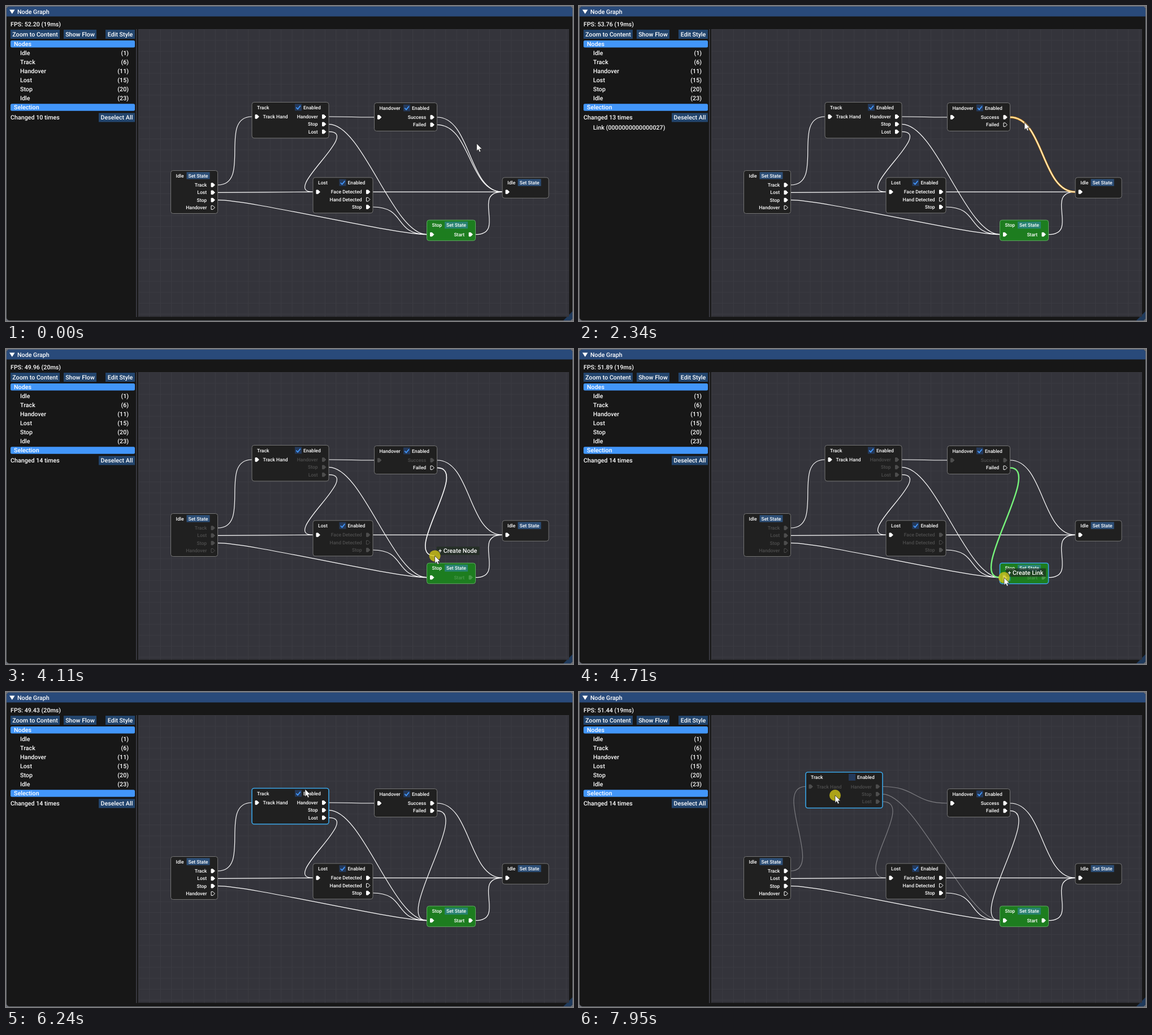
Animation, 1003 px wide and 558 px high, one loop 8 s. Source, as an HTML page:

```html
<!DOCTYPE html>
<html lang="en">
<head>
<meta charset="utf-8">
<title>Node Graph</title>
<style>
  html, body { margin: 0; width: 100%; height: 100%; overflow: hidden; background: #6d7078; }
  svg { display: block; width: 1003px; height: 558px; }
  text { font-family: Roboto, "Open Sans", sans-serif; font-weight: 500; fill: #fff; white-space: pre; text-rendering: geometricPrecision; }
</style>
</head>
<body>
<svg viewBox="0 0 1003 558">
  <defs>
    <pattern id="grid" width="19.4" height="19.4" patternUnits="userSpaceOnUse" x="234" y="41">
      <path d="M.5 0V19.4M0 .5H19.4" stroke="#3b3b42" fill="none"/>
    </pattern>
  </defs>
  <rect x="1" y="1" width="1001" height="556" rx="5" fill="#171717"/>
  <path d="M1 18.5V6a5 5 0 0 1 5-5H997a5 5 0 0 1 5 5V18.5Z" fill="#294a7a"/>
  <path d="M6 6.5H15.6L10.8 14Z" fill="#fff"/>
  <path d="M1002 541V552a5 5 0 0 1-5 5H986Z" fill="#1f3a5c"/>
  <rect x="230" y="41" width="1.6" height="510" fill="#3e3e47"/>
  <rect x="234" y="41" width="762" height="509.5" fill="#34343b"/>
  <rect x="234" y="41" width="762" height="509.5" fill="url(#grid)"/>
  <g id="side"></g>
  <g id="scene"></g>
</svg>
<script>
const LOOP = 8000, STEP = 50;
const BIG = 10.7, SMALL = 8.6, ROW = 13.35, BEND = 60;
const $ = id => document.getElementById(id);

const nodes = {
  idle:     { name: 'Idle', x: 291.5, y: 291.5, w: 83, h: 76, button: 28, out: ['Track', 'Lost', 'Stop', 'Handover'] },
  track:    { name: 'Track', x: 435, y: 170.5, w: 136, h: 63.5, check: 76, in: 'Track Hand', out: ['Handover', 'Stop', 'Lost'] },
  handover: { name: 'Handover', x: 651.5, y: 171.5, w: 111, h: 50, check: 51.5, in: '', out: ['Success', 'Failed'] },
  lost:     { name: 'Lost', x: 543, y: 303.8, w: 106, h: 63, check: 46.5, in: '', out: ['Face Detected', 'Hand Detected', 'Stop'] },
  stop:     { name: 'Stop', x: 744.5, y: 379.2, w: 86, h: 36.5, button: 31.5, in: '', out: ['Start'], green: true },
  end:      { name: 'Idle', x: 878, y: 303.8, w: 82, h: 36.5, button: 27.5, in: '', out: [] }
};
const wires = [
  ['idle', 0, 'track'], ['idle', 1, 'lost'], ['idle', 2, 'stop'],
  ['track', 0, 'handover'], ['track', 1, 'stop'], ['track', 2, 'lost'],
  ['lost', 0, 'end'], ['lost', 2, 'stop'], ['stop', 0, 'end'], ['handover', 0, 'end']
];

// [time, x, y]
const mouseKeys = [
  [0, 832.5, 243.5], [50, 832.5, 243.5], [550, 790, 221], [1200, 787, 219.5], [1700, 787, 213],
  [2000, 788, 206], [2500, 788, 206], [2900, 772, 214], [3200, 754, 211], [3400, 754, 211],
  [3600, 760.5, 262], [3900, 764, 318], [4150, 758, 372], [4500, 752, 405], [5150, 752, 405],
  [5850, 557, 225], [6200, 529, 172], [6500, 517, 180], [6950, 517, 180], [7350, 487, 211.5],
  [7500, 487, 211.5], [7950, 453, 183]
];
const fpsKeys = [
  [0, 52.2], [1200, 54.12], [2300, 53.76], [3600, 51.82], [4050, 49.8], [4700, 51.89],
  [5850, 50.1], [6200, 49.43], [7000, 50.4], [7950, 51.44]
];
const clicks = [[600, 700], [2000, 2100], [2850, 2950], [3400, 5150], [6900, 7000], [7450, 8000]];

const between = (t, a, b) => t >= a && t < b;
const smooth = u => u * u * (3 - 2 * u);

function sample(keys, t, ease = u => u) {
  const i = keys.findIndex(k => k[0] > t);
  if (i < 0) return keys[keys.length - 1].slice(1);
  const a = keys[i - 1], b = keys[i], u = ease((t - a[0]) / (b[0] - a[0]));
  return a.slice(1).map((v, n) => v + (b[n + 1] - v) * u);
}

const text = (x, mid, s, size = BIG, anchor = 'start', alpha = 1) =>
  `<text x="${x}" y="${mid + size * 0.355}" font-size="${size}" text-anchor="${anchor}" opacity="${alpha}">${s}</text>`;
const box = (x, y, w, h, fill, rx = 0, more = '') =>
  `<rect x="${x}" y="${y}" width="${w}" height="${h}" rx="${rx}" fill="${fill}" ${more}/>`;
const stroke = (d, color, width, alpha = 1) =>
  `<path d="${d}" fill="none" stroke="${color}" stroke-width="${width}" opacity="${alpha}"/>`;

function button(x, y, w, h, label) {
  return box(x, y, w, h, '#23456d') + text(x + w / 2, y + h / 2, label, BIG, 'middle');
}

function sidebar() {
  const rows = [['Idle', 1], ['Track', 6], ['Handover', 11], ['Lost', 15], ['Stop', 20], ['Idle', 23]];
  return text(20, 10.3, 'Node Graph')
    + button(8, 42, 87, 16, 'Zoom to Content') + button(102, 42, 58, 16, 'Show Flow') + button(176, 42, 52, 16, 'Edit Style')
    + box(8, 61, 220, 12.5, '#4296fa', 2.5) + text(14, 67.5, 'Nodes')
    + rows.map(([name, id], i) => text(25, 83.3 + i * 16.05, name) + text(217, 83.3 + i * 16.05, `(${id})`, BIG, 'end')).join('')
    + box(8, 173.3, 220, 12.5, '#4296fa', 2.5) + text(14, 179.7, 'Selection')
    + button(164, 189.5, 64, 16, 'Deselect All');
}

function curve(a, b) {
  const half = Math.hypot(b[0] - a[0], b[1] - a[1]) / 2;
  const s = half < BEND ? BEND * Math.sin(Math.PI / 2 * half / BEND) : BEND;
  return `M${a}C${a[0] + s} ${a[1]} ${b[0] - s} ${b[1]} ${b}`;
}

function pin(x, y, full, alpha) {
  return `<path d="M${x} ${y - 3.3}h3.1l3.3 3.3l-3.3 3.3h-3.1z" fill="${full ? '#fff' : 'none'}" stroke="#fff" stroke-linejoin="round" opacity="${alpha}"/>`;
}

const inPos = n => [n.x, n.y + 25.5];
const outPos = (n, i) => [n.x + n.w, n.y + 25.5 + i * ROW];

function drawNode(key, n, s) {
  const hot = key === s.hot, top = n.y + 9;
  let g = box(n.x, n.y, n.w, n.h, n.green ? '#1d7d1f' : '#202020', 4,
    `stroke="${hot ? '#3aa5e6' : n.green ? '#5fa861' : '#747474'}" stroke-width="${hot ? 1.6 : 1}"`);
  g += text(n.x + 9, top, n.name, SMALL);
  if (n.button) {
    const x = n.x + n.button;
    g += box(x, top - 6.3, 41, 12.4, n.green ? '#298272' : '#2d4f77') + text(x + 20.5, top, 'Set State', SMALL, 'middle');
  }
  if (n.check) {
    const x = n.x + n.check, y = top - 6;
    g += box(x, y, 12, 12, '#24395a');
    if (key !== 'track' || s.enabled) g += stroke(`M${x + 2.3} ${y + 6.2}l2.7 2.9l4.9-6`, '#4296fa', 1.7);
    g += text(x + 15, top, 'Enabled', SMALL);
  }
  const off = key === 'track' && !s.enabled;
  if (n.in !== undefined) {
    const y = inPos(n)[1], alpha = off || (s.linking && key === 'handover') ? 0.2 : 1;
    if (s.snap && key === 'stop') g += box(n.x + 4, y - 7, 15, 14, 'rgba(60,180,255,.4)', 3);
    g += pin(n.x + 6, y, true, alpha) + text(n.x + 19.5, y, n.in, SMALL, 'start', alpha);
  }
  n.out.forEach((label, i) => {
    const y = outPos(n, i)[1], source = key === 'handover' && i === 1;
    const alpha = off || (s.linking && !source) ? 0.2 : 1;
    const full = s.wires.some(w => w[0] === key && w[1] === i);
    g += text(n.x + n.w - 19.3, y, label, SMALL, 'end', alpha) + pin(n.x + n.w - 11.5, y, full, alpha);
  });
  return g;
}

function drawWire([from, i, to], s) {
  const d = curve(outPos(s.nodes[from], i), inPos(s.nodes[to]));
  const glow = from === 'handover' && s.glow[i];
  const off = !s.enabled && (from === 'track' || to === 'track');
  return (glow ? stroke(d, glow, glow === s.blue ? 2.8 : 3.3) : '') + stroke(d, '#fff', 1.2, off ? 0.36 : 1);
}

function scene(t) {
  const [mx, my] = sample(mouseKeys, t, smooth);
  const [fps] = sample(fpsKeys, t);
  const linking = between(t, 3400, 5150), snap = linking && my > 397;
  const blue = '#62c4fa', orange = '#ffb032';
  const drag = t >= 7500 ? [mx - 487, my - 211.5] : [0, 0];
  const track = { ...nodes.track, x: nodes.track.x + drag[0], y: nodes.track.y + drag[1] };
  const s = {
    linking, snap, blue,
    enabled: t < 7000,
    hot: t >= 5800 ? 'track' : linking && my > 379 ? 'stop' : '',
    nodes: { ...nodes, track },
    wires: wires.slice(),
    glow: [
      between(t, 1850, 2000) ? blue : between(t, 2000, 2900) ? orange : '',
      between(t, 450, 1500) ? blue : ''
    ]
  };
  if (t < 1500) s.wires.push(['handover', 1, 'end']);
  if (t >= 5150) s.wires.push(['handover', 1, 'stop']);

  const changes = 10 + [600, 1500, 2000, 2900].filter(at => t >= at).length;
  const picked = between(t, 600, 1500) ? 28 : between(t, 2000, 2900) ? 27 : 0;
  let g = text(8, 32, `FPS: ${fps.toFixed(2)} (${Math.round(1000 / fps)}ms)`) + text(8, 197.7, `Changed ${changes} times`);
  if (picked) g += text(25, 215.5, `Link (${String(picked).padStart(16, '0')})`);

  g += s.wires.map(w => drawWire(w, s)).join('');
  if (linking) {
    const end = snap ? inPos(nodes.stop) : [mx, my];
    g += stroke(curve(outPos(nodes.handover, 1), end), snap ? '#78f57c' : '#fff', snap ? 2.4 : 1.6);
  }
  for (const key in s.nodes) g += drawNode(key, s.nodes[key], s);
  if (linking) {
    g += box(mx + 3, my - 16.5, snap ? 71 : 76, 15, 'rgba(32,45,32,.72)', 1)
      + text(mx + 6.5, my - 9, snap ? '+ Create Link' : '+ Create Node');
  }
  if (clicks.some(([a, b]) => between(t, a, b))) g += `<circle cx="${mx}" cy="${my}" r="10" fill="rgba(208,196,22,.8)"/>`;
  g += `<path transform="translate(${mx} ${my})" d="M0 0V13.4L3 10.6L5 15.2L7.3 14.2L5.4 9.8H9.5Z" fill="#fff" stroke="#1a1a1a" stroke-width=".7"/>`;
  return g;
}

$('side').innerHTML = sidebar();
let shown = -1;
function tick() {
  const t = Math.floor(performance.now() % LOOP / STEP) * STEP;
  if (t !== shown) $('scene').innerHTML = scene(shown = t);
  requestAnimationFrame(tick);
}
tick();
</script>
</body>
</html>
```
